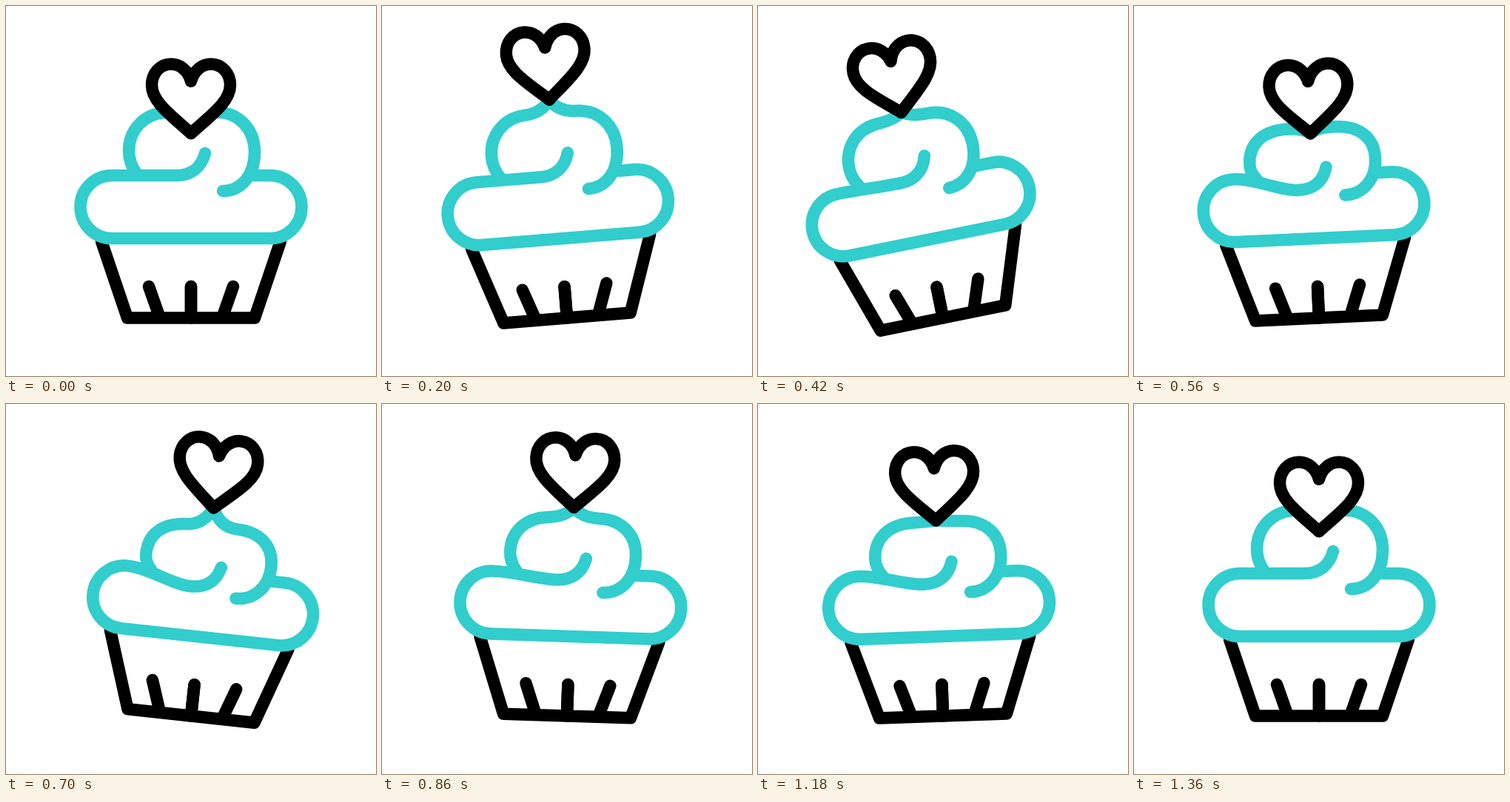
Animation of 500 by 500 pixels, one loop 2 s. Source, as an HTML page:

```html
<!DOCTYPE html>
<html lang="en">
<head>
<meta charset="utf-8">
<title>Cupcake</title>
<style>
  html, body { margin: 0; width: 100%; height: 100%; overflow: hidden; background: #fff; }
  svg { display: block; width: 100vw; height: 100vh; }
  path { fill: none; stroke-width: 16.5; stroke-linecap: round; stroke-linejoin: round; }
  .ink { stroke: #000; }
  .icing { stroke: #32cdcd; }
  #lobe { fill: #fff; }
</style>
</head>
<body>
<svg viewBox="0 0 500 500">
  <g id="cake">
    <path id="cup" class="ink" d="M250 379 V421.5 H164 L129 318 M193 379 L206 416"/>
    <use href="#cup" transform="matrix(-1 0 0 1 500 0)"/>
    <path id="dome" class="icing"/>
    <path id="body" class="icing"/>
    <g id="heart">
      <path id="lobe" class="ink" d="M250 101.5 C246 87 235 78.5 223 78.5 C208 78.5 197 91 197 107 C197 129 222 147 250 172"/>
      <use href="#lobe" transform="matrix(-1 0 0 1 500 0)"/>
    </g>
  </g>
</svg>
<script>
const LOOP = 2000;
// Key poses as [ms, value]: degrees, pixels of hop, share of full squash.
const tilt = [[20, 0], [430, -11.5], [690, 6.2], [1050, -3.3], [1360, 0]];
const hop = [[0, 0], [300, 62], [555, 0], [760, 41.5], [1085, 0], [1220, 18.5], [1360, 0]];
const squash = [[360, 0], [630, 0.95], [830, 0.35], [1040, 1], [1360, 0]];

const el = id => document.getElementById(id);
const cake = el('cake'), dome = el('dome'), body = el('body'), heart = el('heart');

// Sine ease between neighbouring keys, held outside them.
function at(keys, t) {
  const i = keys.findIndex(([time]) => t < time);
  if (i === 0) return keys[0][1];
  if (i < 0) return keys[keys.length - 1][1];
  const [t0, a] = keys[i - 1], [t1, b] = keys[i];
  return a + (b - a) * (1 - Math.cos(Math.PI * (t - t0) / (t1 - t0))) / 2;
}

function draw(t) {
  const sink = 26 * at(squash, t), up = at(hop, t);
  // A point that drops by its own share of the squash.
  const p = (x, y, share) => `${x} ${(y + share * sink).toFixed(2)} `;

  cake.setAttribute('transform', `rotate(${at(tilt, t)} 250 421.5)`);
  heart.setAttribute('transform', `translate(0 ${-up})`);

  dome.setAttribute('d',
    'M' + p(176, 226, 0.3) +
    'C' + p(169, 216, 0.4) + p(166, 206, 0.6) + p(166, 196, 0.65) +
    'C' + p(166, 168, 0.65) + p(186, 146, 1) + p(214, 144, 1) +
    'Q' + p(239, 143, 1) + p(250, 172 - up, 0) +
    'Q' + p(261, 143, 1) + p(284, 143.5, 1) +
    'C' + p(315, 143.5, 1) + p(336, 167, 0.65) + p(336, 197, 0.6) +
    'C' + p(336, 230, 0.4) + p(317, 250, 0.35) + p(293, 250, 0.35));

  body.setAttribute('d',
    'M' + p(269, 199, 0.92) +
    'C' + p(264, 218, 1) + p(250, 229, 0.9) + p(230, 229, 0.9) +
    'C' + p(205, 229, 0.9) + '172 229 143 229' +
    'A42.5 42.5 0 0 0 143 314 H357 A42.5 42.5 0 0 0 357 229 H336');
}

let start;
function frame(now) {
  start ??= now;
  draw((now - start) % LOOP);
  requestAnimationFrame(frame);
}
draw(0);
requestAnimationFrame(frame);
</script>
</body>
</html>
```
